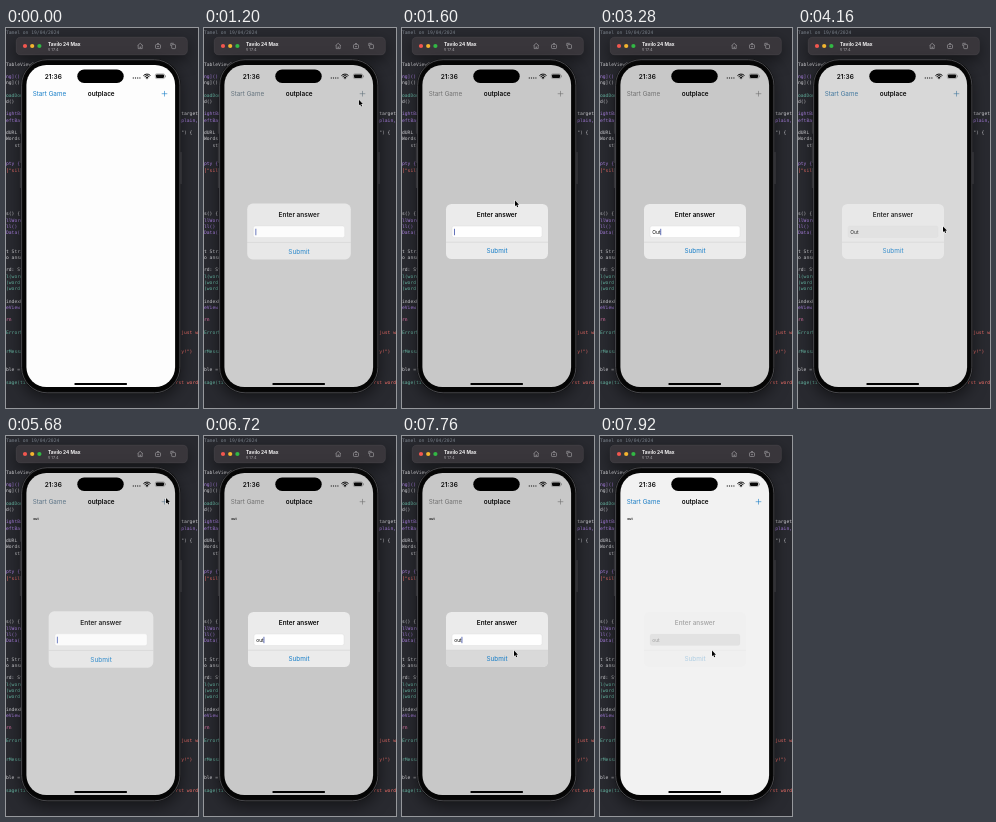
An HTML page with a canvas that plays this animation: 192 by 380 pixels, repeating every 8 s.

```html
<!DOCTYPE html>
<html lang="en">
<head>
<meta charset="utf-8">
<title>Word game</title>
<style>
html, body { margin: 0; width: 100%; height: 100%; overflow: hidden; background: #292a30; }
canvas { display: block; width: 192px; height: 380px; }
</style>
</head>
<body>
<canvas id="stage"></canvas>
<script>
const W = 192, H = 380, LOOP = 8000;
const SANS = 'Inter, Roboto, sans-serif';
const MONO = '"DejaVu Sans Mono", "Liberation Mono", monospace';
const INK = '#080808', BLUE = [22, 126, 200], GRAY = [112, 112, 112];
const canvas = document.getElementById('stage');
const g = canvas.getContext('2d');
const dpr = window.devicePixelRatio || 1;
canvas.width = W * dpr;
canvas.height = H * dpr;

const clamp = v => Math.max(0, Math.min(1, v));
const ramp = (t, a, b) => clamp((t - a) / (b - a));
const ease = u => u * u * (3 - 2 * u);
const rgb = c => `rgb(${c.map(Math.round).join(',')})`;
const mix = (a, b, u) => a.map((v, i) => v + (b[i] - v) * u);
const spring = ms => {
  const x = Math.max(0, ms) * 0.021;
  return 1 - (1 + x) * Math.exp(-x);
};

function box(x, y, w, h, r, fill, stroke, line = 1) {
  g.beginPath();
  g.roundRect(x, y, w, h, r);
  if (fill) { g.fillStyle = fill; g.fill(); }
  if (stroke) { g.strokeStyle = stroke; g.lineWidth = line; g.stroke(); }
}

function text(s, x, y, size, color, weight = 400, align = 'left', family = SANS) {
  g.font = `${weight} ${size}px ${family}`;
  g.textAlign = align;
  g.fillStyle = color;
  g.fillText(s, x, y);
}

function dot(x, y, r, color) {
  g.beginPath();
  g.arc(x, y, r, 0, Math.PI * 2);
  g.fillStyle = color;
  g.fill();
}

function path(color, width, ...lines) {
  g.strokeStyle = color;
  g.lineWidth = width;
  g.beginPath();
  for (const pts of lines) pts.forEach(([x, y], i) => i ? g.lineTo(x, y) : g.moveTo(x, y));
  g.stroke();
}

// Editor behind the simulator: row, text, colour, optional text right of the phone
const TINT = { w: '#d0d0d4', p: '#a97fe0', g: '#67b7a4', k: '#f07ab2', r: '#f4706a', c: '#7d858f' };
const CODE = [
  [0, 'Tamel on 19/04/2024', 'c'],
  [5, 'TableViewCo', 'w'], [7, 'ng]()', 'p'], [8, 'ng]()', 'w'],
  [10, 'oadDone', 'g'], [11, 'd()', 'w'],
  [13, 'ightBar', 'p', ': target', 'w'], [14, 'eftBarB', 'p', '.plain,', 'p'],
  [16, 'dURL = ', 'w', '") {  ', 'w'], [17, 'Words =', 'w'], [18, '   st', 'w'],
  [21, 'pty {', 'p'], [22, '["silkw', 'r'],
  [29, 's() {', 'w'], [30, 'llWords', 'p'], [31, 'll()', 'p'], [32, 'Data()', 'p'],
  [35, 't Strin', 'w'], [36, 'o answe', 'w'],
  [38, 'rd: Str', 'w'], [39, 'l(word:', 'g'], [40, '(word: ', 'g'], [41, '(word: ', 'g'],
  [43, 'indexPa', 'w'], [44, 'eView.i', 'p'], [46, 'rn', 'k'],
  [48, 'ErrorMe', 'g', 'just w', 'r'], [51, 'rMessag', 'g', 'y!")  ', 'r'],
  [54, 'ble = ', 'w'], [56, 'sage(title', 'g', 'rst word', 'r']
];

function editor() {
  g.fillStyle = '#292a30';
  g.fillRect(0, 0, W, H);
  for (const [row, left, tint, right, rightTint] of CODE) {
    const y = 6.3 + row * 6.24;
    text(left, 0, y, 4.68, TINT[tint], 400, 'left', MONO);
    if (right) text(right, W, y, 4.68, TINT[rightTint], 400, 'right', MONO);
  }
}

function shadowed(paint) {
  g.save();
  g.shadowColor = 'rgba(0,0,0,.5)';
  g.shadowBlur = 15 * dpr;
  g.shadowOffsetY = 5 * dpr;
  paint();
  g.restore();
}

function toolbar() {
  shadowed(() => box(10, 9, 171.5, 18, 4.5, '#39363b'));
  box(10.2, 9.2, 171.1, 17.6, 4.3, null, '#4c494e', 0.4);
  ['#f2574f', '#f3b52f', '#32b844'].forEach((c, i) => dot(19 + i * 7.2, 18, 2.1, c));
  text('Tavilo 24 Max', 42, 17.5, 4.8, '#f0eff0', 700);
  text('v 17.4', 42, 23, 4, '#aaa8ac');
  const c = '#b4b2b6', line = 0.55;
  path(c, line, [[131.6, 17.6], [134.2, 15.3], [136.8, 17.6]], [[132.2, 17.2], [132.2, 20.6], [136.2, 20.6], [136.2, 17.2]]);
  dot(134.2, 19.2, 0.6, c);
  box(149.5, 16.6, 5, 3.9, 0.8, null, c, line);
  path(c, line, [[151, 15.5], [153, 15.5]]);
  dot(152, 18.6, 0.7, c);
  box(165.7, 16.6, 3.8, 4, 0.7, null, c, line);
  path(c, line, [[164.8, 18], [164.8, 15.3], [167.8, 15.3]]);
}

function phone() {
  shadowed(() => box(14.9, 31, 159.7, 334.5, 26, '#080808'));
  for (const [x, y, h] of [[13.8, 94, 11], [13.8, 115, 20], [13.8, 140, 20], [174.5, 124, 32]])
    box(x, y, 1.3, h, 0.5, '#343438');
  box(15.6, 31.7, 158.3, 333.1, 25.5, null, '#59595d', 0.8);
  box(17.4, 33.5, 154.7, 329.5, 24, '#050505');
}

function statusBar() {
  text('21:36', 47.3, 50.8, 6.5, INK, 600, 'center');
  box(71.3, 41.5, 46.4, 13.5, 6.75, '#000');
  for (let i = 0; i < 4; i++) dot(127.3 + i * 2.2, 50, 0.65, '#333');
  g.strokeStyle = INK;
  g.lineWidth = 1;
  for (const r of [1.7, 3.3, 4.9]) {
    g.beginPath();
    g.arc(141, 51, r, -Math.PI * 0.76, -Math.PI * 0.24);
    g.stroke();
  }
  dot(141, 50.6, 0.7, INK);
  box(149.3, 45.8, 9.4, 4.8, 1.4, null, '#777', 0.5);
  box(150, 46.5, 8, 3.4, 0.8, INK);
  box(159.3, 47.2, 0.7, 2, 0.3, '#777');
}

// Each session: opening, closing, press on Submit and the times of its keystrokes
const ALERTS = [
  { open: 1000, close: 4108, press: 3980, word: 'Out', keys: [2560, 2800, 3000] },
  { open: 5512, close: 7778, press: 7690, word: 'out', keys: [6320, 6500, 6700] }
];

function alertState(t) {
  for (const a of ALERTS) {
    if (t < a.open || t > a.close + 600) continue;
    const closing = t >= a.close, out = spring(t - a.close), shown = spring(t - a.open);
    return {
      closing, out,
      dim: closing ? 1 - out : shown,
      alpha: closing ? 1 - out ** 1.6 : shown,
      scale: closing ? 1 : 1.2 - 0.2 * shown,
      typed: a.word.slice(0, a.keys.filter(k => t >= k).length),
      pressed: t >= a.press && !closing,
      caret: !closing && (t - a.open < 700 || t > a.keys[0] && t < a.keys[2] + 400 || (t - a.open) % 1000 < 560 || t > a.press)
    };
  }
  return null;
}

function navBar(t, dim) {
  const tint = rgb(mix(BLUE, GRAY, dim * dim));
  text('Start Game', 26.7, 68.2, 6.3, tint);
  text('outplace', 95.2, 68.2, 6.4, INK, 600, 'center');
  const held = ALERTS.some(a => t > a.open - 90 && t < a.open + 60);
  g.globalAlpha = held ? 0.15 : 1;
  path(tint, 0.6, [[155.7, 65.7], [161.3, 65.7]], [[158.5, 62.9], [158.5, 68.5]]);
  g.globalAlpha = 1;
}

function alertBox(a) {
  g.save();
  g.globalAlpha = a.alpha;
  g.translate(95, 203.5);
  g.scale(a.scale, a.scale);
  g.translate(-95, -203.5);
  box(44, 176, 102, 55, 5.5, '#ebebeb');
  if (a.pressed) box(44, 214.3, 102, 16.7, [0, 0, 5.5, 5.5], '#d9d9d9');
  text('Enter answer', 95, 189.3, 6.35, INK, 600, 'center');
  const shade = a.closing ? 248 - 72 * a.out : 254;
  box(50, 198, 90, 11.5, 2, rgb([shade, shade, shade]), '#dadada', 0.4);
  text(a.typed, 52.3, 205.6, 4.9, INK);
  if (a.caret) {
    const x = 52.5 + g.measureText(a.typed).width;
    path('#3c4fa8', 0.8, [[x, 200.8], [x, 207.2]]);
  }
  path('#c9c9c9', 0.5, [[44, 214.2], [146, 214.2]]);
  text('Submit', 95, 225.2, 6.4, rgb(BLUE), 400, 'center');
  g.restore();
}

// Pointer stops: time, x, y
const STOPS = [
  [250, 194, 150], [760, 159, 62], [1120, 159, 62], [1560, 113, 172.6], [3450, 113, 172.6],
  [3850, 112, 214.6], [4070, 112, 214.6], [4160, 145, 198.5], [4620, 159, 62],
  [5520, 159, 62], [5680, 160, 62], [6960, 160, 62], [7560, 112, 214.6], [LOOP, 112, 214.6]
];

function pointer(t) {
  const hidden = t < 250 || t > 2560 && t < 3450 || t > 6320 && t < 6960;
  if (hidden) return;
  const i = STOPS.findIndex(s => s[0] > t);
  const [t0, x0, y0] = STOPS[i - 1], [t1, x1, y1] = STOPS[i];
  const u = ease(ramp(t, t0, t1));
  g.save();
  g.translate(x0 + (x1 - x0) * u, y0 + (y1 - y0) * u);
  g.beginPath();
  for (const [x, y] of [[0, 0], [0, 5.6], [1.3, 4.5], [2.2, 6.6], [3.2, 6.1], [2.3, 4.2], [4, 4.1]]) g.lineTo(x, y);
  g.closePath();
  g.lineJoin = 'round';
  g.strokeStyle = '#fff';
  g.lineWidth = 0.9;
  g.stroke();
  g.fillStyle = '#000';
  g.fill();
  g.restore();
}

function draw(t) {
  g.setTransform(dpr, 0, 0, dpr, 0, 0);
  editor();
  toolbar();
  phone();

  const a = alertState(t), dim = a ? a.dim : 0;
  g.save();
  g.beginPath();
  g.roundRect(20.4, 37, 148.7, 322, 20);
  g.clip();
  const page = 253 - 53 * dim;
  g.fillStyle = rgb([page, page, page]);
  g.fillRect(20, 36, 151, 325);
  statusBar();
  navBar(t, dim);
  g.globalAlpha = ramp(t, 4220, 4480);
  text('out', 27.3, 84, 3.4, INK, 600);
  g.globalAlpha = 1;
  box(68.3, 355, 52.8, 1.9, 0.95, '#000');
  if (a) alertBox(a);
  g.restore();

  pointer(t);
}

const start = performance.now();
function tick() {
  draw((performance.now() - start) % LOOP);
  requestAnimationFrame(tick);
}
tick();
</script>
</body>
</html>
```
